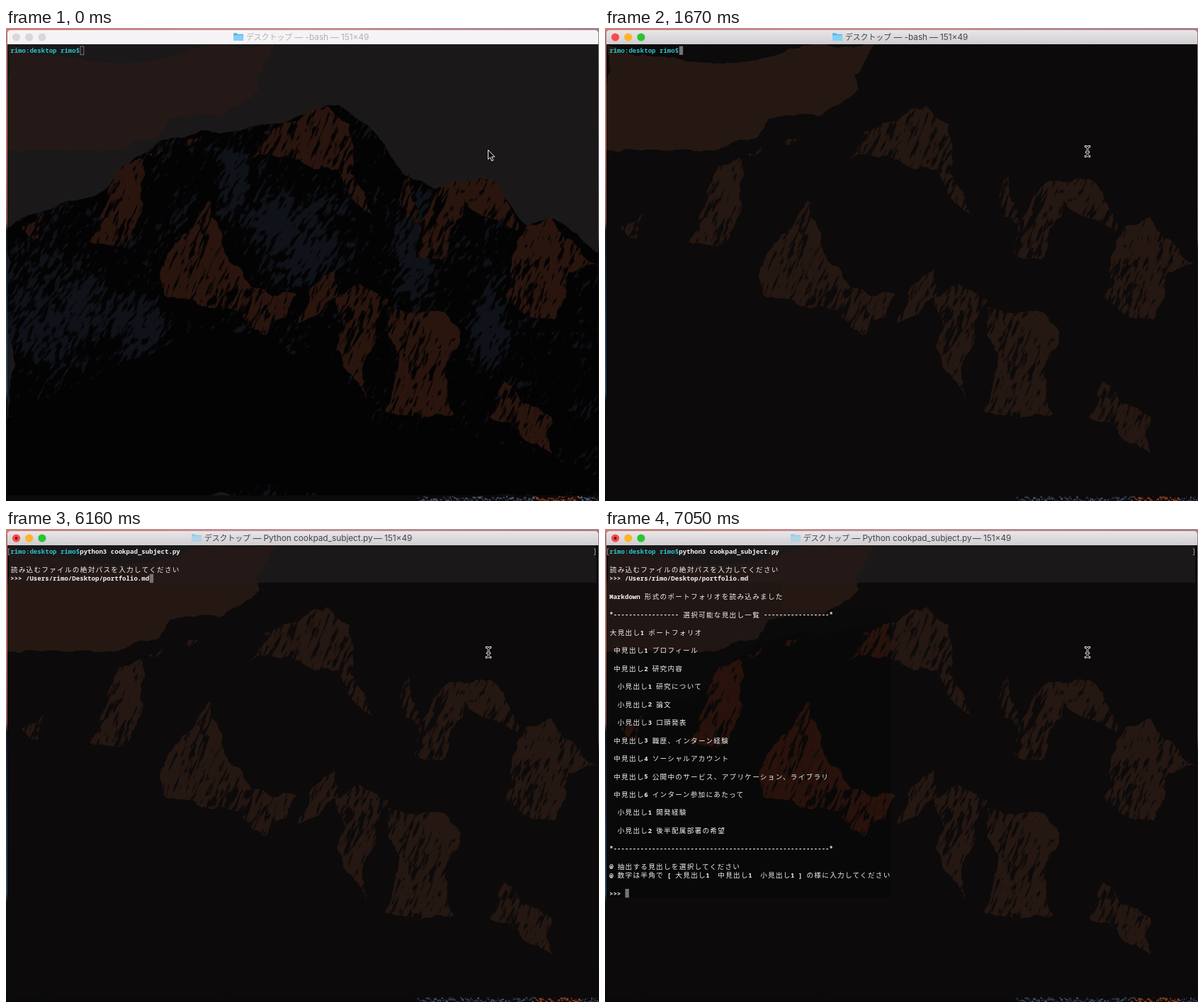
An HTML page with a canvas that plays this animation: 837x669 px, repeating every 8 s.

```html
<!DOCTYPE html>
<html lang="ja">
<head>
<meta charset="utf-8">
<title>Terminal</title>
<style>
html, body { margin: 0; width: 100%; height: 100%; overflow: hidden; background: #0b0a0b; }
canvas, svg { position: absolute; left: 0; top: 0; }
text { white-space: pre; }
.mono { font: 600 9px "Noto Sans Mono", "DejaVu Sans Mono", monospace; letter-spacing: .045px; }
.kana { font: 500 9.6px "Noto Sans CJK JP", "Noto Sans CJK", sans-serif; letter-spacing: 1.29px; }
.bar { font: 11.8px Inter, Roboto, sans-serif; }
.barKana { font: 11px "Noto Sans CJK JP", "Noto Sans CJK", sans-serif; letter-spacing: -.2px; }
</style>
</head>
<body>
<svg id="ui" width="837" height="669" viewBox="0 0 837 669"></svg>
<script>
const W = 837, H = 669, LOOP = 8000;
const FOCUS = 1670, TYPED = 2420, RUN = 4660, PATH = 6160, DONE = 6900, LIST = 7050;
const ui = document.getElementById('ui');
const timed = [];

function show(node, from, to = LOOP) {
  timed.push({ node, from, to });
  return node;
}

// ---------- noise and rough shapes ----------
function seeded(s) {
  return () => {
    s = s + 0x6D2B79F5 | 0;
    let t = Math.imul(s ^ s >>> 15, 1 | s);
    t = t + Math.imul(t ^ t >>> 7, 61 | t) ^ t;
    return ((t ^ t >>> 14) >>> 0) / 4294967296;
  };
}
const rnd = seeded(41);
const lattice = Float32Array.from({ length: 65536 }, rnd);
const at = (i, j) => lattice[(i & 255) << 8 | j & 255];
const mix = (a, b, t) => a + (b - a) * t;

function noise(x, y) {
  const i = Math.floor(x), j = Math.floor(y), u = x - i, v = y - j;
  return mix(mix(at(i, j), at(i + 1, j), u), mix(at(i, j + 1), at(i + 1, j + 1), u), v);
}

// Stretched grain that runs down to the left, with broad patches
function strata(x, y, lean, wide, long) {
  const u = x + lean * y;
  return .5 * noise(u / wide, y / long) + .25 * noise(u / wide * 2.1, y / long * 1.9) + .25 * noise(x / 34, y / 34);
}

// Polygon of key points, each edge broken up by midpoint displacement
function rough(list, amp) {
  const pts = list.split(' ').map(p => p.split(',').map(Number));
  const path = new Path2D();
  const edge = (x, y, u, v) => {
    const len = Math.hypot(u - x, v - y);
    if (len < 4) return path.lineTo(u, v);
    const d = (rnd() - .5) * amp;
    const mx = (x + u) / 2 - (v - y) * d, my = (y + v) / 2 + (u - x) * d;
    edge(x, y, mx, my);
    edge(mx, my, u, v);
  };
  path.moveTo(...pts[0]);
  pts.forEach((p, i) => edge(...p, ...pts[(i + 1) % pts.length]));
  return path;
}

function newCanvas(w, h) {
  const node = document.createElement('canvas');
  node.width = w;
  node.height = h;
  return node;
}

// Alpha mask from a field f(x, y) in 0..1
function mask(f) {
  const node = newCanvas(W, H), c = node.getContext('2d'), img = c.createImageData(W, H);
  for (let y = 100; y < H; y++) {
    for (let x = 0; x < W; x++) img.data[(y * W + x) * 4 + 3] = 255 * Math.min(1, Math.max(0, f(x, y)));
  }
  c.putImageData(img, 0, 0);
  return node;
}

function tint(src, colour) {
  const node = newCanvas(W, H), c = node.getContext('2d');
  c.drawImage(src, 0, 0);
  c.globalCompositeOperation = 'source-in';
  c.fillStyle = colour;
  c.fillRect(0, 0, W, H);
  return node;
}

// ---------- wallpaper ----------
const cloud = rough('0,20 380,20 352,68 358,86 300,125 232,128 215,155 70,172 0,174', .2);
const range = rough('0,284 60,257 140,228 180,185 222,158 330,146 455,109 470,109 560,206 620,232 690,216 736,280 770,269 837,318 837,669 0,669', .16);
const ridge = rough('0,552 200,465 250,432 310,422 475,490 520,560 760,600 837,669 0,669', .2);
const rocks = [
  '118,303 160,195 190,183 196,210 168,304',
  '22,283 60,259 45,298',
  '198,179 230,163 210,182',
  '245,171 276,152 262,166',
  '342,186 365,146 455,110 485,135 521,265 470,200 395,180',
  '223,378 228,320 288,243 315,330 345,365 410,377 365,435 332,400',
  '410,420 465,340 468,378',
  '465,380 500,362 540,385 508,530 477,480',
  '540,395 625,408 642,430 632,547 535,542',
  '682,550 700,498 770,550 770,602',
  '568,205 586,281 560,265',
  '580,325 605,228 690,217 722,287 648,245 618,328',
  '705,380 735,280 770,268 836,335 795,345 775,412'
].map(list => rough(list, .3));

// Snow fields: centre and radii
const fields = [
  [60, 400, 95, 115], [175, 425, 60, 60], [410, 300, 95, 85],
  [320, 230, 30, 75], [575, 310, 50, 90], [680, 425, 40, 60]
];
const depth = (x, y) => fields.reduce((sum, [a, b, rx, ry]) =>
  Math.max(sum, 1 - ((x - a) / rx) ** 2 - ((y - b) / ry) ** 2), 0);

const cuts = mask((x, y) => (strata(x, y, .4, 3, 11) - .53) * 9);
const drifts = mask((x, y) => (strata(x, y, .55, 4, 9) + .3 * depth(x, y) - .61) * 9);

function fade(c, x, y, u, v, stops) {
  const g = c.createLinearGradient(x, y, u, v);
  stops.forEach(([pos, colour]) => g.addColorStop(pos, colour));
  return g;
}

function desktop(c) {
  c.fillStyle = '#0b090b';
  c.fillRect(0, 0, W, H);
  c.fillStyle = fade(c, 0, 0, 0, H, [[0, '#b27672'], [.25, '#b97062'], [.41, '#8c5856'], [.43, '#161c26'], [.6, '#223a54'], [.77, '#2c4968'], [.79, '#0e1014'], [1, '#0a090b']]);
  c.fillRect(0, 0, 2, H);
  c.fillStyle = fade(c, 0, 0, 0, H, [[0, '#a07a80'], [.44, '#6c5560'], [.47, '#1a171c'], [1, '#100d10']]);
  c.fillRect(836, 0, 1, H);
  c.fillStyle = fade(c, 0, 0, W, 0, [[0, '#cb817a'], [.5, '#c29396'], [1, '#a98088']]);
  c.fillRect(0, 0, W, 8);
  for (let x = 580; x < W; x += 1.5) {
    const glow = Math.exp(-(((x - 778) / 30) ** 2)), l = 12 + 30 * rnd();
    c.fillStyle = `hsl(${glow > .3 ? 18 : 218} ${glow > .3 ? 60 : 20}% ${l}%)`;
    c.fillRect(x, 662 + rnd() * 7, 1 + rnd() * 3, 1 + rnd() * 2);
  }
}

function scene(p) {
  const node = newCanvas(W, H), c = node.getContext('2d');
  const fill = (path, colour) => {
    c.fillStyle = colour;
    c.fill(path);
  };
  const stamp = (path, grain) => {
    c.save();
    c.clip(path);
    c.drawImage(grain, 0, 0);
    c.restore();
  };
  desktop(c);
  c.save();
  c.beginPath();
  c.rect(2, 20, 834, 641);
  c.clip();
  c.fillStyle = p.sky;
  c.fillRect(0, 0, W, H);
  fill(cloud, p.cloud);
  fill(range, p.dark);
  if (p.snow) {
    stamp(range, tint(drifts, p.snow));
    fill(ridge, p.dark);
  }
  const shade = tint(cuts, p.dark);
  rocks.forEach(path => {
    fill(path, p.rock);
    stamp(path, shade);
  });
  c.restore();
  return node;
}

const idle = scene({ sky: '#1a1819', cloud: '#241917', dark: '#040304', rock: '#29150e', snow: '#0f1218' });
const live = scene({ sky: '#0c0a0b', cloud: '#251813', dark: '#0c0a0b', rock: '#251711' });
const warm = scene({ sky: '#0b0a0a', cloud: '#201613', dark: '#080808', rock: '#28120b' });

function layer(src, from, to, x = 0, y = 0, w = W, h = H) {
  const node = newCanvas(w, h);
  node.getContext('2d').drawImage(src, -x, -y);
  node.style.left = x + 'px';
  node.style.top = y + 'px';
  document.body.insertBefore(node, ui);
  show(node, from, to);
}

layer(idle, 0, FOCUS);
layer(live, FOCUS, LOOP);
layer(idle, RUN, LOOP, 4, 23, 829, 53);
layer(warm, DONE, LOOP, 6, 76, 244, 51);
layer(warm, LIST, LOOP, 5, 114, 398, 407);

// ---------- window frame ----------
function el(tag, attrs, parent = ui, content) {
  const node = document.createElementNS('http://www.w3.org/2000/svg', tag);
  for (const k in attrs) node.setAttribute(k, attrs[k]);
  if (content) node.textContent = content;
  return parent.appendChild(node);
}
const group = (from, to) => show(el('g', {}), from, to);

const grad = el('linearGradient', { id: 'bar', x1: 0, y1: 0, x2: 0, y2: 1 }, el('defs', {}));
el('stop', { offset: 0, 'stop-color': '#e9e6e9' }, grad);
el('stop', { offset: 1, 'stop-color': '#d0ced0' }, grad);

function frame(from, to, fill, lights) {
  const g = group(from, to);
  el('path', { d: 'M2 23V8q0-5 5-5h824q5 0 5 5v15z', fill }, g);
  lights.forEach((f, i) => el('circle', { cx: 14.5 + i * 18.2, cy: 13, r: 5.6, fill: f }, g));
}
frame(0, FOCUS, '#f6f3f6', Array(3).fill('#dad6da'));
frame(FOCUS, LOOP, 'url(#bar)', ['#fc4948', '#fdb32b', '#2ac434']);
show(el('circle', { cx: 14.5, cy: 13, r: 1.9, fill: '#5c0a0a' }), RUN);

// Folder icon at x, then the title; the window size ends it
function title(from, to, x, fill, faded, name, end) {
  const g = group(from, to);
  const icon = el('g', { transform: `translate(${x} 7)`, opacity: faded ? .5 : 1 }, g);
  el('path', { d: 'M0 1.2q0-.9.9-.9h4l1.3 1.4h7q.9 0 .9.9v7.4q0 .9-.9.9H.9q-.9 0-.9-.9z', fill: '#55b5e4' }, icon);
  el('path', { d: 'M0 3.2h14.1v6.8q0 .9-.9.9H.9q-.9 0-.9-.9z', fill: '#83d0f6' }, icon);
  const put = (px, s, cls = 'bar') => el('text', { x: px, y: 17.2, fill, class: cls }, g, s);
  put(x + 18, 'デスクトップ', 'barKana');
  put(x + 86.5, '—');
  put(x + 101.5, name);
  put(end - 56, '—');
  put(end - 41, '151×49');
}
title(0, FOCUS, 321, '#b3b0b3', false, '-bash', 514);
title(FOCUS, RUN, 321, '#464446', false, '-bash', 514);
title(RUN, LOOP, 262, '#464446', true, 'Python cookpad_subject.py', 575);

// ---------- terminal ----------
const CELL = 5.445, LINE = 12.72;
const colX = col => 6.2 + col * CELL;

function print(from, row, col, str, fill = '#f3f2f2') {
  const g = group(from, LOOP);
  for (const run of str.match(/[\x20-\x7e]+|[^\x20-\x7e]+/g)) {
    const wide = run.charCodeAt(0) > 126;
    el('text', { x: colX(col) + (wide ? .6 : 0), y: 35.2 + row * LINE + (wide ? .3 : 0), fill, class: wide ? 'kana' : 'mono' }, g, run);
    col += run.length * (wide ? 2 : 1);
  }
}

function block(from, to, col, row) {
  show(el('rect', { x: colX(col) + .5, y: 25.6 + row * LINE, width: 5.4, height: 12.4, fill: '#757374' }), from, to);
}

const user = 'rimo';
print(0, 0, 0, `${user}:desktop ${user}$`, '#2fc2cb');
print(TYPED, 0, 18, 'python3 cookpad_subject.py');
print(RUN, 2, 0, '読み込むファイルの絶対パスを入力してください');
print(RUN, 3, 0, '>>>');
print(PATH, 3, 4, `/Users/${user}/Desktop/portfolio.md`);
print(DONE, 5, 0, 'Markdown 形式のポートフォリオを読み込みました');

const dash = n => '-'.repeat(n);
[
  `*${dash(17)} 選択可能な見出し一覧 ${dash(17)}*`,
  '大見出し1 ポートフォリオ',
  ' 中見出し1 プロフィール',
  ' 中見出し2 研究内容',
  '  小見出し1 研究について',
  '  小見出し2 論文',
  '  小見出し3 口頭発表',
  ' 中見出し3 職歴、インターン経験',
  ' 中見出し4 ソーシャルアカウント',
  ' 中見出し5 公開中のサービス、アプリケーション、ライブラリ',
  ' 中見出し6 インターン参加にあたって',
  '  小見出し1 開発経験',
  '  小見出し2 後半配属部署の希望',
  `*${dash(56)}*`,
  '@ 抽出する見出しを選択してください'
].forEach((s, i) => print(LIST, 7 + i * 2, 0, s));
print(LIST, 36, 0, '@ 数字は半角で [ 大見出し1  中見出し1  小見出し1 ] の様に入力してください');
print(LIST, 38, 0, '>>>');

show(el('path', { d: 'M5.2 28H3.4v8.5h1.8M829.8 28h1.8v8.5h-1.8', fill: 'none', stroke: '#a9a7a8', 'stroke-width': .9 }), RUN);

show(el('rect', { x: 105, y: 26, width: 4.8, height: 11.8, fill: 'none', stroke: '#858384', 'stroke-width': .9 }), 0, FOCUS);
block(FOCUS, TYPED, 18, 0);
block(TYPED, RUN, 45, 0);
block(RUN, PATH, 4, 3);
block(PATH, DONE, 36, 3);
block(DONE, LIST, 0, 7);
block(LIST, LOOP, 4, 38);

// ---------- pointer ----------
show(el('path', { d: 'M680.5 172.5v13.2l3-2.8 2.2 5 2.1-.9-2.2-4.9h4.2z', fill: '#050505', stroke: '#f4f4f4', 'stroke-width': 1 }), 0, 1500);
const beam = group(1500, LOOP);
[['#eeeeee', 2.8], ['#0a0a0a', 1.1]].forEach(([stroke, w]) => el('path', {
  d: 'M678.2 167.5q2.8.2 2.8 2.8v8.4q0 2.6-2.8 2.8M683.8 167.5q-2.8.2-2.8 2.8M681 178.7q0 2.6 2.8 2.8M679.4 175.6h3.2',
  fill: 'none', stroke, 'stroke-width': w, 'stroke-linecap': 'square'
}, beam));

// ---------- clock ----------
const start = performance.now();
function tick() {
  const t = Math.max(0, performance.now() - start) % LOOP;
  for (const { node, from, to } of timed) {
    node.style.display = t >= from && t < to ? '' : 'none';
  }
  requestAnimationFrame(tick);
}
tick();
</script>
</body>
</html>
```
